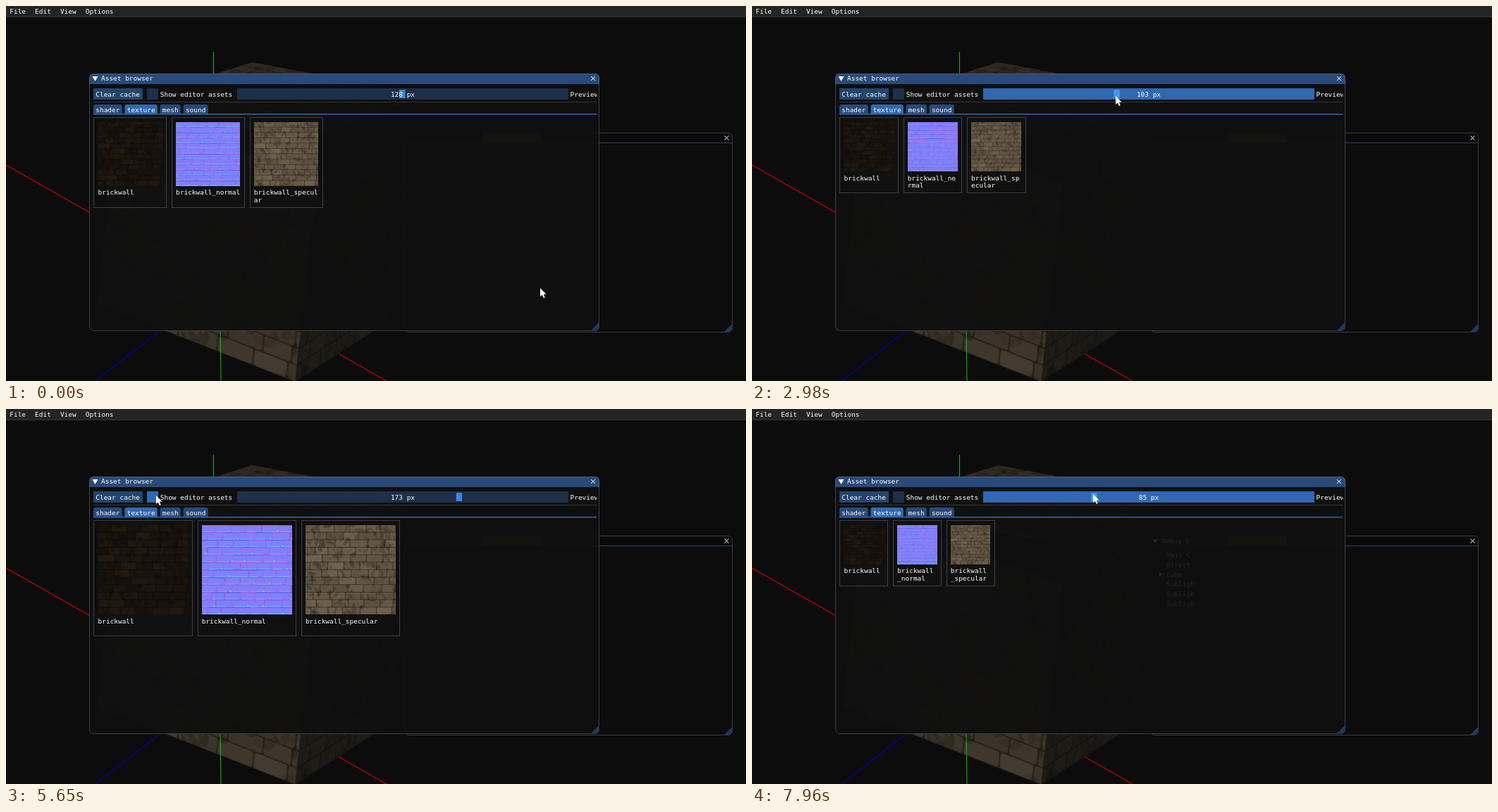
An HTML page with a canvas for the animation above (8 s loop, 1050x533 px).

```html
<!DOCTYPE html>
<html lang="en">
<head>
<meta charset="utf-8">
<title>Asset browser</title>
<style>
  html, body { margin: 0; width: 100%; height: 100%; overflow: hidden; background: #0c0c0c; }
  canvas { display: block; width: 1050px; height: 533px; }
</style>
</head>
<body>
<canvas id="stage" width="1050" height="533"></canvas>
<script>
const LOOP = 8000, SCALE = 0.8133, TEX = 292;
const FONT = '9.46px "DejaVu Sans Mono", monospace';
const BORDER = 'rgba(110,110,128,.5)';
const IDLE = '#1d2f49', HOVER = '#23456e', ACTIVE = '#3069b1';
const SLIDER = { x: 328, w: 470 }, BAR = { y: 117, h: 16 };

// Glides run at a quick, even beat; drags redraw slowly and ease out
const glide = (start, end, x, y, size) =>
  ({ start, end, x, y, size, beat: 75, ease: p => p * p * (3 - 2 * p) });
const drag = (start, end, x, y, size) =>
  ({ start, end, x, y, size, beat: 190, ease: p => 1 - (1 - p) ** 2, held: true });

const home = { x: 758, y: 401, size: 128 };
const strokes = [
  glide(60, 60, 723, 389),
  glide(880, 1190, 593, 357),
  glide(1340, 2090, 562, 124),
  drag(2170, 2290, 562, 124, 129),
  drag(2380, 2990, 513, 128, 101),
  drag(3080, 3190, 540, 128, 116),
  drag(3400, 3590, 691, 126, 195),
  drag(3750, 3750, 713, 128, 212),
  drag(4190, 4390, 654, 136, 181),
  glide(4570, 4570, 421, 117, 173),
  glide(4820, 4820, 213, 123),
  glide(6250, 6930, 641, 133),
  drag(7110, 7230, 612, 126, 160),
  drag(7690, 7960, 484, 121, 85)
];

function stateAt(t) {
  let from = home;
  for (const s of strokes) {
    if (t < s.start) break;
    const span = s.end - s.start;
    const steps = Math.round(span / s.beat) + 1;
    const done = steps > 1 ? Math.floor((t - s.start) / span * (steps - 1) + 1e-6) + 1 : 1;
    const e = s.ease(Math.min(1, done / steps));
    const mix = (a, b = a) => Math.round(a + (b - a) * e);
    from = { x: mix(from.x, s.x), y: mix(from.y, s.y), size: mix(from.size, s.size), held: s.held };
  }
  return from;
}

const stage = document.getElementById('stage').getContext('2d');

function layer(w, h) {
  const c = document.createElement('canvas');
  c.width = w;
  c.height = h;
  return c.getContext('2d');
}

function random(seed) {
  return () => {
    seed = (seed * 1664525 + 1013904223) >>> 0;
    return seed / 4294967296;
  };
}

function text(g, s, x, y, color = '#fff') {
  g.font = FONT;
  g.fillStyle = color;
  g.fillText(s, x, Math.round(y + 3.4));
}

function rect(g, x, y, w, h, color) {
  g.fillStyle = color;
  g.fillRect(x, y, w, h);
}

function path(g, points, color, width = 1) {
  g.strokeStyle = color;
  g.lineWidth = width;
  g.beginPath();
  points.forEach(([x, y]) => g.lineTo(x, y));
  g.stroke();
}

function poly(g, points, color) {
  g.beginPath();
  points.forEach(([x, y]) => g.lineTo(x, y));
  g.closePath();
  g.fillStyle = color;
  g.fill();
}

function round(g, x, y, w, h, r, fill, stroke) {
  g.beginPath();
  g.roundRect(x, y, w, h, r);
  if (fill) { g.fillStyle = fill; g.fill(); }
  if (stroke) { g.strokeStyle = stroke; g.lineWidth = 1; g.stroke(); }
}

const shade = (rgb, k) => `rgb(${rgb.map(v => Math.round(v * k))})`;

// Twelve courses in a loose running bond
function eachBrick(draw) {
  const rnd = random(77), h = TEX / 12;
  for (let row = 0; row < 12; row++) {
    let x = -(row % 2) * 24 - rnd() * 10;
    while (x < TEX) {
      const w = 40 + rnd() * 20;
      draw(x, row * h, w, h, rnd);
      x += w;
    }
  }
}

function stoneTexture(mortar, rgb, low, blots) {
  const g = layer(TEX, TEX), rnd = random(5);
  rect(g, 0, 0, TEX, TEX, mortar);
  eachBrick((x, y, w, h) => {
    round(g, x + 1, y + 1, w - 2, h - 2, 4, shade(rgb, low + rnd() * (1 - low)));
  });
  for (let i = 0; i < 300; i++) {
    g.fillStyle = `rgba(14,11,8,${blots * rnd()})`;
    g.beginPath();
    g.ellipse(rnd() * TEX, rnd() * TEX, 3 + rnd() * 12, 2 + rnd() * 6, rnd() * 3, 0, 7);
    g.fill();
  }
  return g.canvas;
}

function normalTexture() {
  const g = layer(TEX, TEX);
  rect(g, 0, 0, TEX, TEX, '#8080ff');
  eachBrick((x, y, w, h, rnd) => {
    rect(g, x, y, w, 2.6, rnd() < 0.6 ? '#b04be0' : '#6350d8');
    rect(g, x + 3, y + h - 2.6, w * (0.5 + rnd() * 0.4), 2.4, '#68c6ea');
    rect(g, x, y + 2, 2, h - 4, '#c25fdd');
    rect(g, x + w - 2.2, y + 3, 2.2, h - 6, '#568ee2');
    if (rnd() < 0.4) rect(g, x + w - 7, y + h - 5, 6, 4, '#5ce6cf');
    if (rnd() < 0.3) rect(g, x, y + 4, 3, h * 0.5, '#d93fb0');
  });
  return g.canvas;
}

const stone = stoneTexture('#3a3126', [110, 97, 78], 0.84, 0.26);
const cards = [
  ['brickwall', stoneTexture('#0f0d0a', [34, 26, 16], 0.65, 0.4)],
  ['brickwall_normal', normalTexture()],
  ['brickwall_specular', stone]
];
const editorCard = ['default', stoneTexture('#262626', [40, 40, 40], 1, 0)];

// Lays the stone texture over a parallelogram given by a corner and two sides, then darkens it
function face(g, [ox, oy], [ux, uy], [vx, vy], dark) {
  g.save();
  g.transform(ux / TEX, uy / TEX, vx / TEX, vy / TEX, ox, oy);
  g.drawImage(stone, 0, 0);
  rect(g, 0, 0, TEX, TEX, `rgba(10,9,7,${dark})`);
  g.restore();
}

function closeMark(g, x, y) {
  path(g, [[x - 3, y - 3], [x + 3, y + 3]], '#fff');
  path(g, [[x + 3, y - 3], [x - 3, y + 3]], '#fff');
}

function grip(g, x, y) {
  poly(g, [[x, y - 13], [x, y - 5], [x - 5, y], [x - 13, y]], '#20385b');
}

function panel(g, x, y, w, h, fill, bar) {
  round(g, x, y, w, h, 6, fill);
  round(g, x, y, w, 15, [6, 6, 0, 0], bar);
  round(g, x + 0.5, y + 0.5, w - 1, h - 1, 6, null, BORDER);
  grip(g, x + w, y + h);
}

function drawScene() {
  const g = layer(1050, 533);
  rect(g, 0, 0, 1050, 533, '#0c0c0c');
  path(g, [[0, 226], [540, 533]], '#c80000', 1.2);
  path(g, [[294.5, 65], [294.5, 300]], '#00c800');
  path(g, [[217, 463], [127, 533]], '#0000b4', 1.2);

  face(g, [350, 80], [255, 48], [-190, 60], 0.58);
  face(g, [160, 140], [281, 110], [-31, 284], 0.42);
  face(g, [441, 250], [140, -90], [-31, 284], 0.78);
  path(g, [[304, 462], [305, 533]], '#00c800');

  rect(g, 0, 0, 1050, 15, '#242423');
  rect(g, 0, 15, 1050, 1, '#343436');
  ['File', 'Edit', 'View', 'Options'].forEach((s, i) => text(g, s, 5.3 + i * 35.8, 8));

  panel(g, 565, 180, 466, 284, 'rgba(13,13,13,.96)', '#0a0a0a');
  rect(g, 566, 194, 464, 1, '#27456f');
  closeMark(g, 1022.5, 187.5);

  panel(g, 118, 96, 724, 366, 'rgba(15,15,15,.94)', '#294a7a');
  rect(g, 676, 181, 83, 13, '#151310');
  poly(g, [[122.5, 100], [130.5, 100], [126.5, 107]], '#fff');
  text(g, 'Asset browser', 135, 103);
  closeMark(g, 833, 103);

  rect(g, 124, BAR.y, 70, BAR.h, '#23456e');
  text(g, 'Clear cache', 127.3, 125.3);
  text(g, 'Show editor assets', 218.8, 125.3);
  g.save();
  g.beginPath();
  g.rect(798, 112, 40.5, 24);
  g.clip();
  text(g, 'Preview', 800.5, 125.3);
  g.restore();
  rect(g, 124, 136, 714, 1, '#36363d');

  let x = 124;
  ['shader', 'texture', 'mesh', 'sound'].forEach(name => {
    const w = name.length * 5.69 + 6.6;
    round(g, x, 140, w, 13.5, [3, 3, 0, 0], name === 'texture' ? '#3069b0' : '#28497a');
    text(g, name, x + 3.3, 147.3);
    x += w + 3.7;
  });
  rect(g, 124, 153, 714, 1.5, '#3069b0');
  return g.canvas;
}

const scene = drawScene();

function drawSlider(g, size, color, held) {
  rect(g, SLIDER.x, BAR.y, SLIDER.w, BAR.h, color);
  const mid = 333 + size * 458.6 / 256;
  rect(g, mid - 4.2, 119, 8.4, 12, held ? '#4296fa' : '#3d85e0');
  const label = size + ' px';
  text(g, label, 563 - label.length * 2.847, 125.3);
}

function drawCheckbox(g, color, on) {
  rect(g, 200, BAR.y, BAR.h, BAR.h, color);
  if (on) path(g, [[203.5, 125], [206.5, 128.5], [212.5, 121]], '#4296fa', 2);
}

function drawCard(g, [name, texture], index, size) {
  const side = size * SCALE, image = (size - 16) * SCALE;
  const x = 124.3 + index * (side + 6.5), y = 158;
  const left = Math.round(x), right = Math.round(x + side);
  const bottom = Math.round(y + side + 24.4);
  g.strokeStyle = BORDER;
  g.lineWidth = 1;
  g.strokeRect(left + 0.5, y + 0.5, right - left - 1, bottom - y - 1);
  g.drawImage(texture, x + 6.5, y + 6.5, image, image);
  const columns = Math.max(1, Math.floor((size - 16) / 7));
  for (let i = 0; i * columns < name.length; i++) {
    text(g, name.slice(i * columns, (i + 1) * columns), x + 6.2, y + 15.5 + image + i * 10.57);
  }
}

// The covered tree shows faintly through the front window
function drawTree(g) {
  const ink = '#242424';
  text(g, 'Debug G', 581, 187.5, ink);
  poly(g, [[568, 185], [576, 185], [572, 191]], ink);
  poly(g, [[578, 232], [578, 238], [582, 235]], ink);
  ['Main C', 'Direct', 'Cube', 'Subligh', 'Subligh', 'Subligh']
    .forEach((s, i) => text(g, s, 588, 207.5 + i * 13.8, ink));
}

function drawPointer(g, x, y) {
  const shape = [[0, 0], [0, 12], [2.8, 9.5], [4.8, 14], [6.7, 13.2], [4.8, 8.8], [8.5, 8.6]];
  poly(g, shape.map(([a, b]) => [x + a, y + b]), '#fff');
}

const within = (v, a, b) => v >= a && v < b;

function draw(t) {
  const g = stage;
  const { x, y, size, held } = stateAt(t);
  const overBar = y > BAR.y && y < BAR.y + BAR.h;
  const overSlider = overBar && within(x, SLIDER.x, SLIDER.x + SLIDER.w);
  const overBox = overBar && within(x, 200, 321);
  const pressed = within(t, 5650, 5710) || within(t, 6250, 6325);
  const editor = within(t, 5710, 6325);

  g.drawImage(scene, 0, 0);
  if (t >= 7690) drawTree(g);
  drawCheckbox(g, pressed ? ACTIVE : overBox ? HOVER : IDLE, editor);
  drawSlider(g, size, held ? ACTIVE : overSlider ? HOVER : IDLE, held);
  const shown = editor ? [...cards, editorCard] : cards;
  shown.forEach((card, i) => drawCard(g, card, i, size));
  drawPointer(g, x, y);
}

stage.imageSmoothingQuality = 'high';
function tick() {
  draw(performance.now() % LOOP);
  requestAnimationFrame(tick);
}
tick();
</script>
</body>
</html>
```
